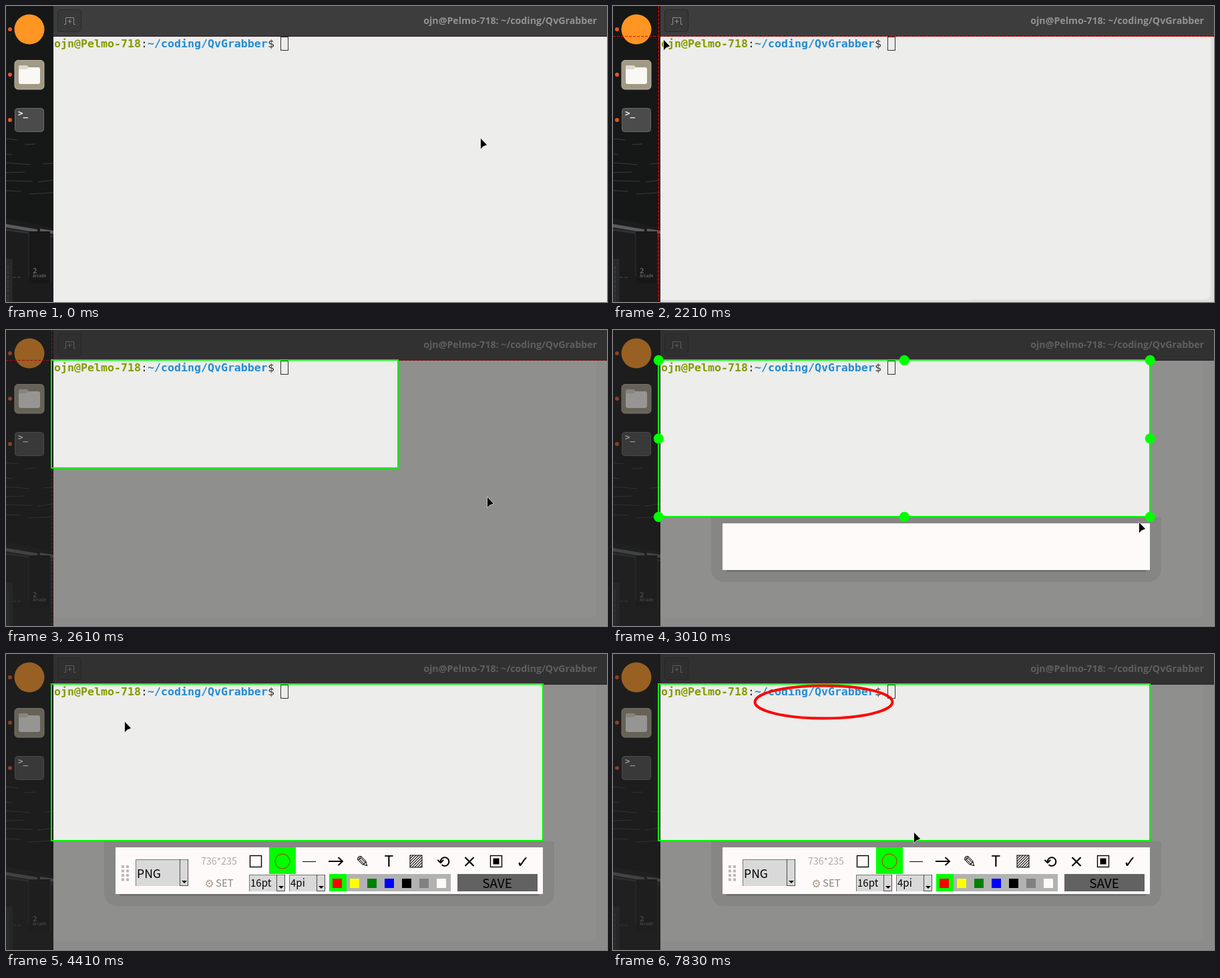
An HTML page that plays this animation: 900 px wide and 444 px high, repeating every 8 s.

```html
<!DOCTYPE html>
<html lang="en">
<head>
<meta charset="utf-8">
<title>Screen capture</title>
<style>
html, body { margin: 0; width: 100%; height: 100%; overflow: hidden; background: #161717; }
svg { display: block; width: 900px; height: 444px; }
text { white-space: pre; }
.mono { font: 700 16.6px "DejaVu Sans Mono", monospace; }
.title { font: 700 14.2px "Open Sans", "Noto Sans", sans-serif; fill: #929292; }
.ui { font-family: "Noto Sans CJK SC", "Noto Sans CJK JP", "Noto Sans CJK", "Noto Sans", sans-serif; }
.icon { font: 24px "DejaVu Sans", sans-serif; text-anchor: middle; }
.line { fill: none; stroke: #000; }
</style>
</head>
<body>
<svg viewBox="0 0 900 444">
  <defs>
    <pattern id="hatch" width="4" height="4" patternUnits="userSpaceOnUse">
      <path d="M-1 1L1-1M0 4L4 0M3 5L5 3" stroke="#000" stroke-width="1.1"/>
    </pattern>
  </defs>

  <!-- launcher -->
  <rect width="71" height="444" fill="#161717"/>
  <path d="M0 199l18 2M28 208l16-1M0 222l9 1M0 235l36 3M56 237l15-1M0 250l28-1M0 262l40 1M48 264l23-3M0 277l22 1M34 282l37-2" fill="none" stroke="#3a3c3c"/>
  <path d="M0 318L71 333V444H0Z" fill="#1c1c1d"/>
  <path d="M0 327l47 8v5L0 332ZM51 334l20 3v5l-20-4Z" fill="#5a5c60"/>
  <path d="M0 334l71 10v3L0 337Z" fill="#303234"/>
  <path d="M34 338h32v78H34Z" fill="#181819"/>
  <path d="M34 340v66M67 345v70M9 380v64" stroke="#303132"/>
  <path d="M0 379h9v65H0Z" fill="#282929"/>
  <path d="M3 390v54M10 407h12" stroke="#444" stroke-dasharray="5 2"/>
  <g class="ui" fill="#606060" font-weight="700">
    <text x="40" y="401" font-size="11">2</text>
    <text x="40" y="407" font-size="6">Arcade</text>
  </g>
  <g fill="#e95420">
    <circle cx="6" cy="35" r="3"/><circle cx="6" cy="103" r="3"/><circle cx="6" cy="171" r="3"/>
  </g>
  <circle cx="35" cy="35" r="22.5" fill="#ff9522"/>
  <rect x="13" y="81.5" width="44" height="43.5" rx="5" fill="#a09984" stroke="#bab4a1"/>
  <path d="M19 92q0-3 3-3h9l3 3h14q3 0 3 3v19q0 3-3 3H22q-3 0-3-3Z" fill="#faf8f5"/>
  <path d="M19 95v-3q0-3 3-3h9l3 3-3 3Z" fill="#e0d8cd"/>
  <rect x="13.5" y="153.5" width="43" height="35" rx="4" fill="#4b4b4b" stroke="#6b6b6b"/>
  <text class="mono" x="18" y="165" fill="#fff" style="font-size:12.5px">&gt;_</text>

  <!-- terminal window -->
  <rect x="71" width="829" height="45" fill="#3d3d3d"/>
  <rect x="71" y="45" width="829" height="399" fill="#ededeb"/>
  <path d="M71 45.500H900" stroke="#2a1c27"/>
  <rect x="77.500" y="5.500" width="35" height="33" rx="4" fill="#383838" stroke="#292929"/>
  <path d="M87 27.500h2.500v-10h12v10h2.500M95.500 20v6M92.500 23h6" fill="none" stroke="#8f8f8f"/>
  <text id="title" class="title" x="885" y="27" text-anchor="end"></text>
  <text class="mono" y="62">
    <tspan id="user" x="72" fill="#859900"></tspan><tspan x="202" fill="#333" font-weight="400">:</tspan><tspan id="dir" x="212" fill="#268bd2"></tspan><tspan x="392" fill="#333" font-weight="400">$</tspan>
  </text>
  <rect x="411.500" y="46.500" width="11" height="20" fill="none" stroke="#333"/>

  <path id="edge" d="M895 46h5v398H525q5-4 15-4h345q10 0 10-10ZM71 441h460v3H71Z" fill="#000" opacity=".06"/>
  <g id="cross" fill="none" stroke-dasharray="4 2">
    <path id="crossX" d="M0 .5H900" stroke="#f00"/>
    <path id="crossY" d="M.5 0V444"/>
  </g>

  <!-- capture layer -->
  <g id="capture">
    <path id="shade" fill="#262626" fill-opacity=".47" fill-rule="evenodd"/>
    <path d="M884 46h16v398H71V430H884Z" opacity=".025"/>
    <g id="panel">
      <path d="M147 281H821V356q0 22-22 22H169q-22 0-22-22Z" fill="#868684"/>
      <path d="M170 361.500H798" stroke="#737371" stroke-width="3"/>
      <rect x="164" y="290" width="640" height="70" fill="#fffafa"/>
      <g id="tools" class="ui">
        <g id="grip"></g>
        <g id="boxes"></g>
        <text x="292" y="316" font-size="14.200" fill="#aaa">736*235</text>
        <text class="icon" x="304.500" y="350" style="font-size:16px" fill="#a99c88">⚙</text>
        <text x="314" y="349" font-size="15" fill="#858585">SET</text>
        <rect id="pick" x="394" y="290" width="40" height="40" fill="#0f0"/>
        <rect class="line" x="365.500" y="302.500" width="17" height="17" stroke-width="1.400"/>
        <circle id="ring" class="line" cx="414" cy="311" r="11"/>
        <path class="line" d="M444 311.500h20"/>
        <path class="line" d="M483 311h21M497.500 305l6.500 6-6.500 6" stroke-width="1.900"/>
        <text class="icon" x="534" y="320">✎</text>
        <text x="573.500" y="319" font-size="23" text-anchor="middle">T</text>
        <rect x="605" y="302" width="18" height="18" fill="url(#hatch)" stroke="#000"/>
        <text class="icon" x="654.500" y="320">⟲</text>
        <path class="line" d="M687.500 305l13 13M700.500 305l-13 13" stroke-width="2.200"/>
        <rect class="line" x="725.500" y="302.500" width="17" height="17" stroke-width="1.400"/>
        <rect x="729.500" y="306.500" width="9" height="9"/>
        <text class="icon" x="774" y="320">✓</text>
        <rect x="484" y="330" width="182" height="26" fill="#b2b2b2"/>
        <rect x="484" y="330" width="26" height="26" fill="#0f0"/>
        <g id="swatches"></g>
        <rect x="676" y="330" width="120" height="26" fill="#626262"/>
        <text x="735.500" y="351" font-size="19" text-anchor="middle">SAVE</text>
      </g>
    </g>
    <rect id="frame" fill="none" stroke="#0f0" stroke-width="2"/>
    <g id="handles" fill="#0f0"></g>
    <ellipse id="oval" fill="none" stroke="#f00" stroke-width="4"/>
  </g>
  <path id="cursor" d="M1 1V16L4.500 12.500L10 10.300Z" stroke="#dcdcda" stroke-width="1.400" paint-order="stroke"/>
</svg>
<script>
const LOOP = 8000, TICK = 200, LAG = 100;
const USER = 'ojn@Pelmo-718', DIR = '~/coding/QvGrabber';
const AREA = { x: 68, y: 45, w: 736, h: 235 };

// moments of the story
const AIM = 1010, PRESS = 2210, SHADE = 2410, RELEASE = 3010, TOOLS = 3210, PICK = 4010;
const OVAL = 6020, OVAL_END = 6220;

// runs of movement: start time, number of steps
const runs = [[200, 3], [1010, 21 + 1], [5620, 6], [7230, 4]];

// pointer path: time, x, y
const path = [
  [0, 710, 198], [600, 236, 185], [1010, 236, 185], [1410, 148, 93], [2010, 69, 47],
  [2210, 75, 50], [2310, 158, 86], [2410, 453, 164], [2610, 720, 250], [2810, 804, 280],
  [3010, 787, 288], [3210, 740, 296], [3810, 411, 322], [4010, 405, 316], [4410, 177, 101],
  [5210, 207, 46], [5520, 213, 47], [5820, 403, 81], [6020, 419, 97], [6220, 419, 97],
  [6620, 213, 39], [7030, 213, 39], [7830, 450, 267]
];

const $ = id => document.getElementById(id);
const set = (id, attrs) => {
  for (const k in attrs) $(id).setAttribute(k, attrs[k]);
};
const show = (id, on) => set(id, { visibility: on ? 'inherit' : 'hidden' });
const rect = (x, y, w, h, fill) =>
  `<rect x="${x}" y="${y}" width="${w}" height="${h}" fill="${fill}"/>`;

// time of the latest screen refresh
function held(t) {
  let last = 0;
  for (const [start, n] of runs) {
    if (t >= start) last = start + TICK * Math.min(n - 1, Math.floor((t - start) / TICK));
  }
  return last;
}

function pointer(t) {
  const i = path.findIndex(p => p[0] >= t);
  if (i < 0) return path[path.length - 1].slice(1);
  if (i === 0) return path[0].slice(1);
  const a = path[i - 1], b = path[i], k = (t - a[0]) / (b[0] - a[0]);
  return [1, 2].map(j => Math.round(a[j] + (b[j] - a[j]) * k));
}

function combo(x, y, w, h, label, size, base) {
  const bx = x + w - 13, by = y + h - 8;
  return rect(x, y, w, h, '#d9d9d9') +
    `<path class="line" d="M${x + .5} ${y + h}V${y + .5}H${x + w}" stroke-opacity=".45"/>` +
    `<path class="line" d="M${bx + .5} ${y}V${y + h - .5}H${x + w - .5}V${y}" stroke-opacity=".65"/>` +
    `<path d="M${bx + 3} ${by}h8l-4 4Z"/>` +
    `<text x="${x + 2}" y="${base}" font-size="${size}">${label}</text>`;
}

function build() {
  $('title').textContent = `${USER}: ${DIR}`;
  $('user').textContent = USER;
  $('dir').textContent = DIR;
  let dots = '', grip = '';
  for (let i = 0; i < 9; i++) {
    if (i === 4) continue;
    const x = AREA.x + AREA.w / 2 * (i % 3), y = AREA.y + AREA.h / 2 * Math.floor(i / 3);
    dots += `<circle cx="${x + .3}" cy="${y + .3}" r="7.6"/>`;
  }
  for (let i = 0; i < 8; i++) grip += rect(173 + i % 2 * 7, 317 + (i >> 1) * 6.5, 4, 4, '#b9b7b7');
  $('handles').innerHTML = dots;
  $('grip').innerHTML = grip;
  $('boxes').innerHTML = combo(194, 308, 79, 40, 'PNG', 17.6, 336) +
    combo(364, 331, 54, 25, '16pt', 15, 349) + combo(424, 331, 54, 25, '4pi', 15, 349);
  $('swatches').innerHTML = ['red', 'yellow', 'green', 'blue', 'black', 'gray', 'snow']
    .map((c, i) => rect(489 + 26 * i, 337, 14, 14, c)).join('');
}

function draw(t) {
  const s = held(t), [x, y] = pointer(s), [lx, ly] = pointer(s - LAG);
  set('cursor', { transform: `translate(${x} ${y})` });

  // the crosshair follows the pointer, then stays at the pressed corner
  const pressed = s >= PRESS, shaded = s >= SHADE;
  const hx = pressed ? AREA.x : x - 1, hy = pressed ? AREA.y : y - 2;
  show('edge', s >= AIM && !shaded);
  show('cross', s >= AIM && s < RELEASE);
  set('crossX', { transform: `translate(0 ${hy})` });
  set('crossY', { transform: `translate(${hx} 0)`, stroke: pressed ? '#f00' : '#333' });

  // the selection trails the pointer
  const done = s >= RELEASE;
  const w = done ? AREA.w : Math.max(1, lx - AREA.x), h = done ? AREA.h : Math.max(1, ly - AREA.y);
  show('capture', shaded);
  set('frame', { x: AREA.x, y: AREA.y, width: w, height: h });
  set('shade', { d: `M0 0H900V444H0ZM${AREA.x} ${AREA.y}h${w}v${h}h${-w}Z` });

  const picked = s >= PICK;
  show('panel', done);
  show('tools', s >= TOOLS);
  show('handles', done && !picked);
  show('pick', picked);
  set('ring', { style: `stroke:${picked ? '#d02000' : '#000'}` });

  const [ex, ey] = pointer(Math.min(s, OVAL_END) - LAG);
  show('oval', s >= OVAL);
  set('oval', {
    cx: (212 + ex) / 2, cy: (47 + ey) / 2,
    rx: Math.max(0, (ex - 213) / 2), ry: Math.max(0, (ey - 48) / 2)
  });
}

build();
const begin = performance.now();
function tick() {
  draw((performance.now() - begin) % LOOP);
  requestAnimationFrame(tick);
}
tick();
</script>
</body>
</html>
```
